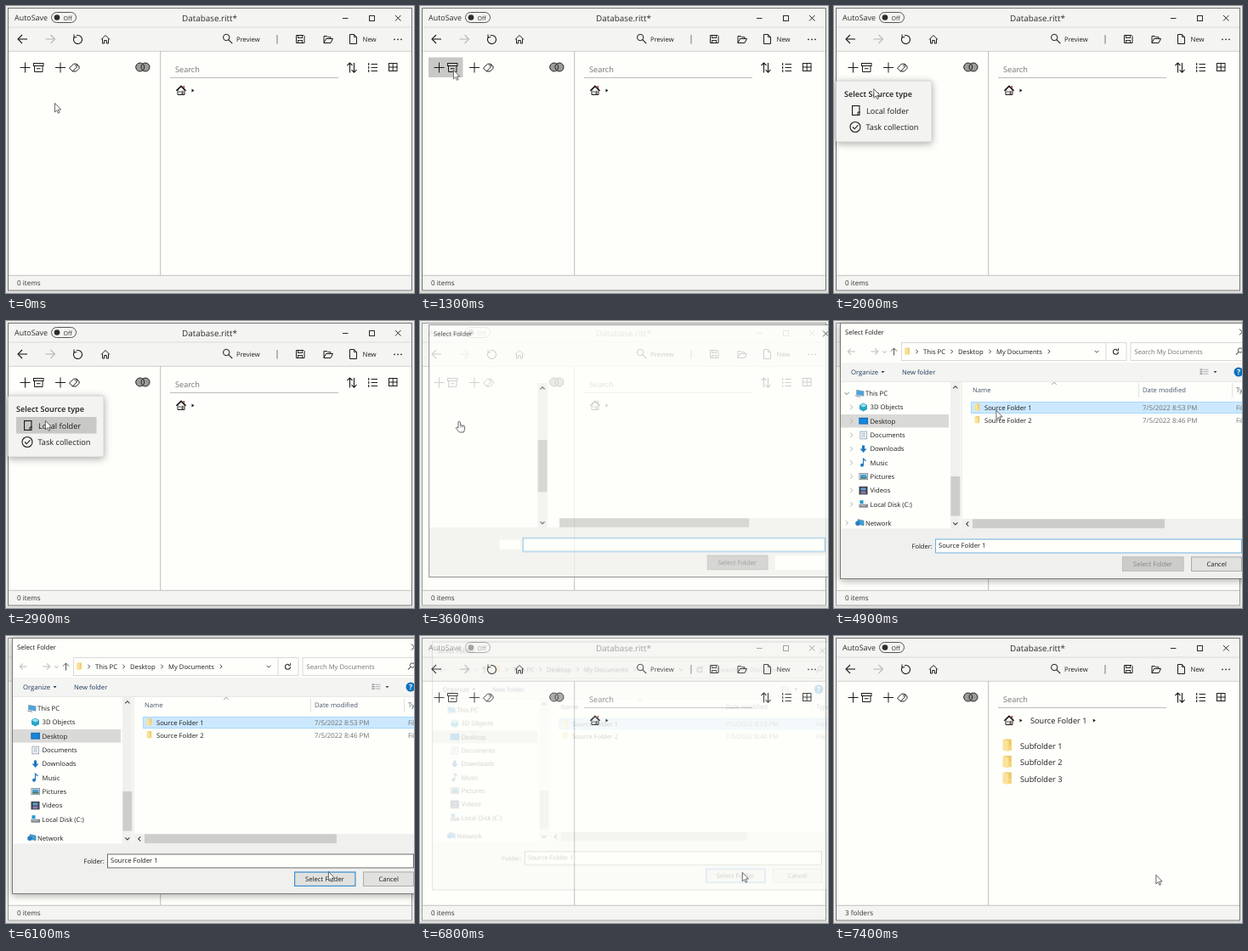
An HTML page with a canvas for the animation above (8800 ms loop, 480x338 px).

```html
<!DOCTYPE html>
<html lang="en">
<head>
<meta charset="utf-8">
<title>Adding a folder</title>
<style>
  html, body { margin: 0; width: 100%; height: 100%; overflow: hidden; background: #e9e9e7; }
  canvas { display: block; width: 480px; height: 338px; }
</style>
</head>
<body>
<canvas id="stage"></canvas>
<script>
const W = 480, H = 338, LOOP = 8800, STEP = 100;
const PAPER = '#fefefb', BAR = '#f4f4f2', INK = '#1c1c1c';
const dpr = Math.max(1, window.devicePixelRatio || 1);

function prepare(canvas, w) {
  canvas.width = w * dpr;
  canvas.height = H * dpr;
  const c = canvas.getContext('2d');
  c.scale(dpr, dpr);
  c.textRendering = 'geometricPrecision';
  return c;
}
const LAYER_W = 500;
const screen = prepare(document.getElementById('stage'), W);
const layerCanvas = document.createElement('canvas');
const layer = prepare(layerCanvas, LAYER_W);
let g = screen;

// Drawing helpers
function text(s, x, y, size = 9.2, color = INK, weight = 400) {
  g.font = `${weight} ${size}px "Open Sans", "Noto Sans", sans-serif`;
  g.fillStyle = color;
  g.fillText(s, x, y);
}
function box(x, y, w, h, fill, stroke, lw = 1) {
  if (fill) { g.fillStyle = fill; g.fillRect(x, y, w, h); }
  if (stroke) {
    g.strokeStyle = stroke;
    g.lineWidth = lw;
    g.strokeRect(x + lw / 2, y + lw / 2, w - lw, h - lw);
  }
}
function path(points, color = INK, lw = 1, closed = false, fill) {
  g.beginPath();
  for (let i = 0; i < points.length; i += 2) g.lineTo(points[i], points[i + 1]);
  if (closed) g.closePath();
  if (fill) { g.fillStyle = fill; g.fill(); }
  if (color) { g.strokeStyle = color; g.lineWidth = lw; g.stroke(); }
}
function disc(x, y, r, fill, stroke, lw = 1, from = 0, to = Math.PI * 2) {
  g.beginPath();
  g.arc(x, y, r, from, to);
  if (fill) { g.fillStyle = fill; g.fill(); }
  if (stroke) { g.strokeStyle = stroke; g.lineWidth = lw; g.stroke(); }
}
function chevron(x, y, dir, size, color, lw = 1) {
  const [dx, dy] = { r: [1, 0], l: [-1, 0], d: [0, 1], u: [0, -1] }[dir];
  const h = size / 2;
  path([x - dx * h - dy * size, y - dy * h - dx * size, x + dx * h, y + dy * h,
        x - dx * h + dy * size, y - dy * h + dx * size], color, lw);
}
function arrow(x, y, len, head, dir, color, lw = 1.1) {
  const tip = x + dir * len / 2;
  path([x - dir * len / 2, y, tip, y], color, lw);
  path([tip - dir * head, y - head, tip, y, tip - dir * head, y + head], color, lw);
}
function lens(x, y, r, color, side = 1) {
  disc(x, y, r, null, color);
  path([x + side * r * .7, y + r * .7, x + side * r * 1.9, y + r * 1.9], color, 1.1);
}
function plus(x, y) {
  path([x - 6, y, x + 6, y]);
  path([x, y - 6, x, y + 6]);
}
function triangle(x, y) {
  path([x, y - 2, x + 3, y, x, y + 2], null, 0, true, INK);
}
function folder(x, y, w, h) {
  box(x + w * .15, y, w * .75, h * .9, '#edca68');
  path([x, y + h * .04, x + w * .6, y + h * .12, x + w * .6, y + h, x, y + h * .9], null, 0, true, '#fae29a');
  box(x + w * .6, y + h * .5, w * .3, h * .42, '#f5d67c');
}

// Time helpers
const smooth = p => p * p * (3 - 2 * p);
const ramp = (t, a, b) => Math.min(1, Math.max(0, (t - a) / (b - a)));
function follow(keys, t) {
  let [, x, y] = keys[0];
  for (let i = 1; i < keys.length; i++) {
    const [a, ax, ay] = keys[i - 1], [b, bx, by] = keys[i];
    if (t < a) break;
    const p = smooth(ramp(t, a, b));
    x = ax + (bx - ax) * p;
    y = ay + (by - ay) * p;
  }
  return [x, y];
}
const POINTER = [
  [300, 57, 114], [1000, 39, 75], [1500, 39, 75], [2100, 47, 99], [2500, 46, 117],
  [3900, 46, 117], [4700, 190.5, 104.8], [5200, 190.5, 104.8], [6100, 379, 277],
  [6700, 379, 277], [7000, 378.5, 281]
];

// Main window
function titleBar(active) {
  const ink = active ? '#2c2c2c' : '#8c8c8c';
  text('AutoSave', 10, 17, 8.95, ink);
  g.beginPath();
  g.roundRect(53.5, 7.5, 29, 12, 6);
  g.strokeStyle = active ? '#555' : '#999';
  g.lineWidth = 1;
  g.stroke();
  disc(60, 13.5, 3.3, ink);
  text('Off', 67.5, 16.6, 7, ink);
  text('Database.ritt*', 207, 17.7, 9.9, ink);
  path([396, 14.5, 402.5, 14.5], ink);
  box(427, 11, 7, 7, null, ink);
  path([458, 11, 464.5, 17.5], ink);
  path([464.5, 11, 458, 17.5], ink);
}
function toolbar() {
  arrow(19.5, 39, 11, 5, -1, INK);
  arrow(52, 39, 11, 5, 1, '#b9b9b9');
  disc(84.5, 39.5, 5, null, INK, 1.1, -1.9, 3.9);
  path([80, 33.5, 80, 36.8, 83.3, 36.8], INK);
  path([112, 39.5, 117, 34.5, 122, 39.5], INK);
  path([113.5, 38.5, 113.5, 44, 115.7, 44, 115.7, 40.5, 118.3, 40.5, 118.3, 44, 120.5, 44, 120.5, 38.5], INK);
  lens(259.2, 37, 3.7, INK);
  text('Preview', 271, 42, 7.7);
  path([319, 34, 319, 44.5], '#777');
  path([341.5, 34.5, 350, 34.5, 351, 35.5, 351, 43.5, 341.5, 43.5], INK, 1, true);
  box(343, 34, 6, 4, null, INK, .9);
  box(343, 40, 6, 4, null, INK, .9);
  path([374, 43.5, 374, 35.5, 377.5, 35.5, 378.5, 36.7, 382, 36.7, 382, 38.5], INK);
  path([374, 43.5, 376.5, 38.5, 384.5, 38.5, 382, 43.5], INK, 1, true);
  path([404.5, 33.5, 409.5, 33.5, 412.5, 36.5, 412.5, 44.5, 404.5, 44.5], INK, 1, true);
  path([409.5, 33.5, 409.5, 36.5, 412.5, 36.5], INK, .9);
  text('New', 419.5, 42, 7.8);
  for (const x of [457, 461, 465]) disc(x, 39.3, .85, INK);
}
function panels() {
  plus(22.5, 72.5);
  box(32, 67, 12.5, 4, null, INK, 1);
  path([33.5, 71, 33.5, 77.5, 43, 77.5, 43, 71], INK);
  path([36, 73.7, 40.5, 73.7], INK);
  plus(64, 72.5);
  path([74.5, 73, 79.5, 68.3, 83.3, 68.3, 83.3, 72, 78.3, 77], INK, 1, true);
  path([83.3, 68.5, 86, 71, 86, 73.5, 82.5, 77, 78.3, 77], INK);
  disc(81.5, 70.3, .6, INK);
  disc(157.7, 72, 5, '#9b9b99');
  disc(164, 72, 5, '#9b9b99');
  disc(157.7, 72, 5, null, '#222');
  disc(164, 72, 5, null, '#222');

  text('Search', 199, 77.7, 9.2, '#747474');
  path([193, 84.5, 391, 84.5], '#bcbcba');
  path([404.5, 78.5, 404.5, 67], INK, 1.1);
  path([401.5, 70, 404.5, 67, 407.5, 70], INK, 1.1);
  path([409.5, 67, 409.5, 78], INK, 1.1);
  path([406.5, 75.2, 409.5, 78.2, 412.5, 75.2], INK, 1.1);
  for (const y of [68.5, 72.5, 76.5]) {
    path([429.5, y, 437, y], INK);
    path([426.7, y - 1.5, 426.7, y + 1.5], INK, 1.1);
  }
  box(450, 67, 10.5, 10, null, INK);
  path([455.2, 67, 455.2, 77], INK);
  path([450, 72, 460.5, 72], INK);
}
function crumbHome() {
  path([202, 99, 206, 95.2, 210, 99, 210, 104.5, 202, 104.5], INK, 1, true, '#f4f4f0');
  path([200.3, 99.8, 206, 94.2, 211.7, 99.8], INK, 1.4);
  box(208.5, 94, 1.5, 3, '#a33a34');
  box(203.5, 100, 2, 2, '#5f9e9a');
  box(206.5, 100, 2, 4.3, '#6d4a3c');
  triangle(218.5, 99.5);
}
function mainWindow(t) {
  const active = t < 3000 || t >= 6900;
  const added = t >= 7100;
  box(0, 0, W, H, '#ebebe9');
  box(0, 336, W, 2, '#dededc');
  box(2, 2, 476, 333.5, PAPER);
  box(2, 2, 476, 51, BAR);
  path([3, 25, 477, 25], '#dadad8');
  path([3, 53.3, 477, 53.3], '#d0d0ce');
  box(2, 317, 476, 18, BAR);
  path([181.7, 53, 181.7, 317], '#bdbdbb');
  path([3, 317.3, 477, 317.3], '#c2c2c0');

  if (t >= 800 && t < 1700) box(10, 60.5, 40.5, 23.5, t < 1300 ? '#d6d6d4' : '#c8c8c6');
  titleBar(active);
  toolbar();
  panels();
  crumbHome();
  text(added ? '3 folders' : '0 items', 13, 329.3, 8.1, '#333');
  if (added) {
    text('Source Folder 1', 231, 103);
    triangle(304.8, 99.5);
  }
  g.globalAlpha = ramp(t, 7100, 7300);
  if (g.globalAlpha > 0) {
    for (let i = 0; i < 3; i++) {
      const y = 121.5 + i * 19.5;
      folder(198.5, y, 11.5, 14.5);
      text('Subfolder ' + (i + 1), 219, y + 11);
    }
  }
  g.globalAlpha = 1;
  box(2, 2, 476, 333.5, null, active ? '#747472' : '#9a9a98');
}

// Source type menu
function menu(hover) {
  g.beginPath();
  g.roundRect(2.5, 88, 112.5, 72, 1.5);
  g.fillStyle = '#f3f3f1';
  g.fill();
  g.strokeStyle = '#cfcfcd';
  g.lineWidth = .8;
  g.stroke();
  text('Select Source type', 12, 107, 9.1, INK, 600);
  if (hover) box(12, 113, 94.5, 19.5, '#c8c8c6');
  box(21, 117, 9.5, 12, null, INK, 1.1);
  path([28, 129, 28, 125, 31, 125], INK);
  text('Local folder', 38, 126.5);
  disc(25, 142.5, 6, null, INK, 1.1);
  path([22, 142.5, 24.2, 144.8, 28.3, 140.3], INK, 1.1);
  text('Task collection', 37.5, 146.3);
}

// Folder dialog
const TREE_ICONS = {
  pc(x, y) {
    path([x + 1.5, y - 4, x + 10, y - 2.5, x + 10, y + 3, x + 1.5, y + 1.5], '#7fa3ba', .7, true, '#4ba3dc');
    path([x, y + 2.5, x + 6, y + 4], '#7b8d99');
  },
  cube(x, y) {
    path([x + 5, y - 5, x + 9.5, y - 2.5, x + 9.5, y + 2.5, x + 5, y + 5, x + .5, y + 2.5, x + .5, y - 2.5], null, 0, true, '#2aa5c6');
    path([x + 1, y - 2, x + 5, y, x + 9, y - 2, x + 5, y - 4.3], null, 0, true, '#9be0ee');
  },
  desktop(x, y) { box(x, y - 4, 10.5, 7.5, '#1687d9', '#1a66a8', .8); },
  page(x, y) {
    box(x + 1, y - 4.5, 8.5, 9.5, '#fff', '#8b98a3', .8);
    for (let i = -2; i < 4; i += 2) path([x + 3, y + i, x + 7.5, y + i], '#7d9db8', .8);
  },
  down(x, y) { path([x + 3.5, y - 4, x + 6.5, y - 4, x + 6.5, y, x + 9, y, x + 5, y + 4.5, x + 1, y, x + 3.5, y], null, 0, true, '#1f78c1'); },
  note(x, y) {
    disc(x + 3.5, y + 3, 2, '#1f78c1');
    path([x + 5, y + 3, x + 5, y - 4.5, x + 8, y - 2], '#1f78c1', 1.2);
  },
  photo(x, y) {
    box(x, y - 4, 10.5, 8, '#f2f6f8', '#748390', .8);
    box(x + 1.5, y - 2.5, 7.5, 5, '#4c9dcc');
    box(x + 1.5, y + .7, 7.5, 1.8, '#4f7f63');
  },
  film(x, y) { box(x, y - 4.5, 10, 9.5, '#3c3f45'); box(x + 2, y - 3, 6, 3, '#5aa2d0'); box(x + 2, y + 1, 6, 3, '#8a7ab8'); },
  disk(x, y) { box(x, y, 10.5, 4, '#7f868c'); box(x + 1, y + 1, 7, 1, '#c8cdd0'); box(x + 1, y - 4.5, 4, 4, '#2498d6'); },
  net(x, y) {
    path([x + 3, y - 4, x + 10, y - 2.5, x + 10, y + 3, x + 3, y + 1.5], '#4d7f9e', .7, true, '#3fa0d6');
    disc(x + 3, y + .5, 2.8, '#2c7fc0');
  }
};
const TREE = [
  ['This PC', 'pc'], ['3D Objects', 'cube'], ['Desktop', 'desktop'], ['Documents', 'page'],
  ['Downloads', 'down'], ['Music', 'note'], ['Pictures', 'photo'], ['Videos', 'film'],
  ['Local Disk (C:)', 'disk'], ['Network', 'net']
];
const D = 7.7;

function addressRow() {
  arrow(20.5, 36, 8.5, 3.5, -1, '#c4c4c4');
  arrow(47.5, 36, 8.5, 3.5, 1, '#c4c4c4');
  chevron(59.5, 36.5, 'd', 2, '#aaa');
  path([70.5, 40.5, 70.5, 32], '#555');
  path([67, 35.5, 70.5, 32, 74, 35.5], '#555');
  box(79, 25, 265.5, 22, null, '#d9d9d7');
  folder(83, 31.5, 6.5, 8.5);
  for (const [name, x] of [['This PC', 105], ['Desktop', 146], ['My Documents', 191]]) {
    chevron(x - 7.5, 36, 'r', 2.3, '#444');
    text(name, x, 39, D);
  }
  chevron(253, 36, 'r', 2.3, '#444');
  chevron(309, 36, 'd', 2.5, '#555');
  path([320, 26, 320, 46], '#d9d9d7');
  disc(331.5, 36.3, 3, null, '#333', 1.1, 0, 5.2);
  path([331.8, 34.7, 334.6, 34.7, 334.6, 32], '#333');
  box(348.5, 25, 160, 22, null, '#d9d9d7');
  text('Search My Documents', 353.5, 39, D, '#757575');
  lens(478, 34.5, 2.7, '#555', -1);
}
function commandRow() {
  box(8, 49, 491, 22.5, '#f4f5f3');
  path([8, 71.3, 499, 71.3], '#e6e6e4');
  text('Organize', 20, 63.3, D, '#1e395b');
  path([55.5, 59, 59.5, 59, 57.5, 61.3], null, 0, true, '#1e395b');
  text('New folder', 80, 63.3, D, '#1e395b');
  for (let y = 56.5; y < 64; y += 2.5) {
    box(430.5, y, 3, 1.4, '#8a9299');
    path([434.5, y + .7, 440.5, y + .7], '#aaa', .9);
  }
  path([446.5, 59, 450.5, 59, 448.5, 61.3], null, 0, true, '#444');
  disc(476, 60, 5.5, '#0d72bd');
  text('?', 474, 63.2, 8.5, '#fff', 700);
}
function tree(chevrons) {
  box(8, 110, 127, 15.5, '#d9d9d7');
  TREE.forEach(([name, icon], i) => {
    const root = i === 0 || i === 9;
    const y = i === 9 ? 237.7 : 85.3 + i * 16.3;
    TREE_ICONS[icon](root ? 25 : 29.5, y);
    text(name, root ? 37 : 42.5, y + 2.8, D);
    if (chevrons > 0) {
      g.globalAlpha = chevrons;
      chevron(root ? 15 : 20.5, y, i ? 'r' : 'd', 2.6, i ? '#a8a8a8' : '#666', .9);
      g.globalAlpha = 1;
    }
  });
}
function fileList(selected, hover) {
  const head = '#46566c';
  text('Name', 163, 84.3, D, head);
  text('Date modified', 363, 84.3, D, head);
  text('Type', 473, 84.3, D, head);
  chevron(259, 73.5, 'u', 2.6, '#888', .9);
  path([358.5, 73, 358.5, 90], '#e2e2e0');
  path([468.5, 73, 468.5, 90], '#e2e2e0');
  if (selected) box(161, 95, 338, 14, '#cce8fe', '#a9d8fa');
  else if (hover) box(161, 95, 338, 14, '#e5f3fe');
  ['8:53', '8:46'].forEach((clock, i) => {
    const y = 105 + i * 14.8;
    folder(165.5, y - 7.7, 6.3, 8.7);
    text('Source Folder ' + (i + 1), 177, y, D);
    text(`7/5/2022 ${clock} PM`, 363, y, 7.9, '#6f6f6f');
    text('File folder', 473, y, D, '#6f6f6f');
  });
}
function dialog(t) {
  const filled = t >= 3800, selected = t >= 4900, ready = t >= 5000;
  const pressed = t >= 6200 && t < 6500;
  box(7, 2, 492, 302, PAPER);
  text('Select Folder', 13, 16, D);
  path([477, 9.5, 484, 16.5], '#333');
  path([484, 9.5, 477, 16.5], '#333');

  if (filled) {
    addressRow();
    commandRow();
    tree(ramp(t, 4300, 4700) * (1 - ramp(t, 4900, 5200)));
    fileList(selected, t >= 4600);
    box(149.5, 72, 1, 172, '#e6e6e4');
    box(151, 233, 340, 11.5, '#f0f0ee');
    chevron(157, 239, 'l', 2.6, '#444', 1.1);
  } else {
    box(389, 233, 110, 11.5, '#f0f0ee');
  }
  box(137, 72, 11.5, 172.5, '#f0f0ee');
  chevron(142.8, 78, 'u', 2.6, '#444', 1.1);
  chevron(142.8, 238.7, 'd', 2.6, '#444', 1.1);
  box(137.3, filled ? 183 : 140, 11, filled ? 46.5 : 62, '#cdcdcb');
  box(163, 233.3, 226, 11, '#cdcdcb');

  box(8, 244.5, 491, 59, '#f0f0ee');
  box(119, 256.5, 361, 17, PAPER, ready ? '#6a6a6a' : '#6db0e0');
  if (selected) text('Source Folder 1', 123, 267, D);
  if (filled) text('Folder:', 91.5, 268, 7.55);
  else box(91.5, 259, 25, 11.5, PAPER);

  if (pressed) box(339, 277.5, 72.5, 17.5, '#cce4f7', '#1c5f9c');
  else if (ready) box(339, 277.5, 72.5, 17.5, '#e1e1df', '#3c90d2', 1.2);
  else box(339, 277.5, 72.5, 17.5, '#cccccb', '#bfbfbd');
  text('Select Folder', 352, 289, D, ready ? INK : '#858585');
  if (filled) {
    box(420, 277.5, 60, 17.5, '#e1e1df', '#adadab');
    text('Cancel', 438.5, 289, 7.55);
  } else box(420, 277.5, 60, 17.5, PAPER);
  box(7, 2, 492, 302, null, '#7a7a78');
}

// Paints a group apart so that it can fade and scale as one.
// The shadow shows only at full opacity, or it would tint the inside.
function overlay(paint, alpha, scale, cx, cy) {
  g = layer;
  g.clearRect(0, 0, LAYER_W, H);
  paint();
  g = screen;
  g.save();
  g.globalAlpha = alpha;
  if (alpha === 1) {
    g.shadowColor = 'rgba(0,0,0,.32)';
    g.shadowBlur = 9 * dpr;
    g.shadowOffsetY = 2 * dpr;
  }
  g.translate(cx, cy);
  g.scale(scale, scale);
  g.drawImage(layerCanvas, -cx, -cy, LAYER_W, H);
  g.restore();
}

function pointer(t) {
  const [x, y] = follow(POINTER, t);
  g.save();
  g.translate(x, y);
  g.lineJoin = 'round';
  if (t >= 3000 && t < 4000) {
    g.beginPath();
    g.moveTo(-1, 8);
    g.lineTo(-1, 2);
    g.quadraticCurveTo(.2, 0, 1.4, 2);
    g.lineTo(1.4, 5.5);
    g.lineTo(5.5, 6.3);
    g.quadraticCurveTo(7, 6.6, 6.8, 8.5);
    g.lineTo(5.6, 14);
    g.lineTo(.3, 14);
    g.lineTo(-3.8, 9.3);
    g.quadraticCurveTo(-3.4, 7.2, -1, 9);
    g.closePath();
    g.fillStyle = '#fff';
    g.fill();
    g.strokeStyle = '#555';
    g.lineWidth = .9;
    g.stroke();
    for (const fx of [1.6, 3.4, 5.1]) path([fx, 6, fx, 8.5], '#666', .6);
  } else {
    path([.4, .4, .4, 11, 2.8, 8.7, 4.4, 12.3, 6, 11.6, 4.4, 8.1, 7.6, 8], '#555', .9, true, '#fff');
  }
  g.restore();
}

function draw(t) {
  g = screen;
  mainWindow(t);

  if (t >= 1500 && t < 3200) {
    const shown = ramp(t, 1400, 1700) * (1 - ramp(t, 2900, 3200));
    const hover = follow(POINTER, t)[1] >= 113;
    overlay(() => menu(hover), shown, 1, 0, 0);
  }
  if (t >= 3500 && t < 6900) {
    let alpha = 1, scale = 1;
    if (t < 3600) { alpha = .4; scale = .97; }
    else if (t < 3700) { alpha = .8; scale = .987; }
    else if (t >= 6800) { alpha = .2; scale = .97; }
    else if (t >= 6700) { alpha = .6; scale = .985; }
    overlay(() => dialog(t), alpha, scale, 245, 152);
  }
  pointer(t);
}

let last = -1;
function tick() {
  const t = Math.floor((performance.now() % LOOP) / STEP) * STEP;
  if (t !== last) draw(last = t);
  requestAnimationFrame(tick);
}
draw(0);
requestAnimationFrame(tick);
</script>
</body>
</html>
```
